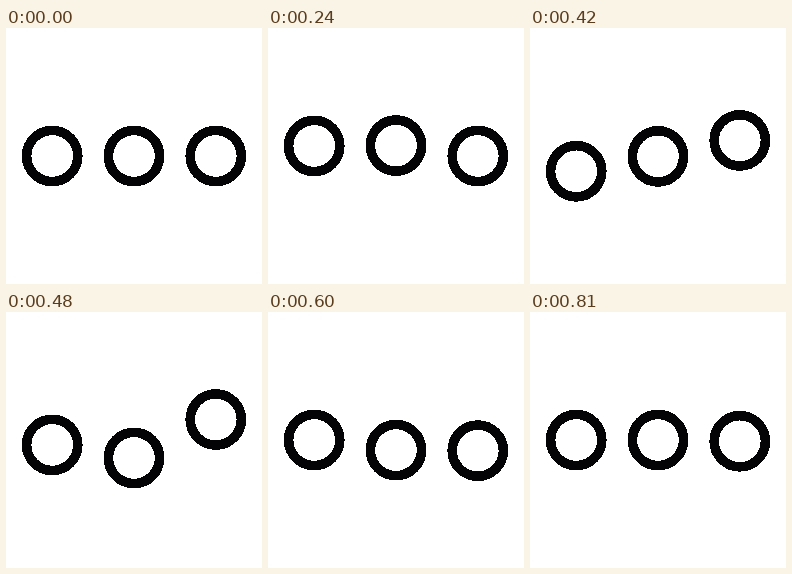
Animation of 256x256 px, one loop 0.84 s. Source, as an HTML page:

```html
<!DOCTYPE html>
<html lang="en">
<head>
<meta charset="utf-8">
<title>Bouncing rings</title>
<style>
  html, body {
    margin: 0;
    width: 100%;
    height: 100%;
    overflow: hidden;
    background: #fff;
  }
  svg {
    display: block;
    width: 100%;
    height: 100%;
    shape-rendering: crispEdges;
  }
  circle {
    cy: 128px;
    fill: none;
    stroke: #040305;
    stroke-width: 9.6px;
    animation: bounce 840ms cubic-bezier(.37, 0, .63, 1) calc(var(--i) * 150ms) infinite;
  }
  /* Three 180 ms moves, then a 300 ms rest */
  @keyframes bounce {
    0% { cy: 128px; }
    21.4286% { cy: 107.5px; }
    42.8571% { cy: 148.5px; }
    64.2857%, 100% { cy: 128px; }
  }
</style>
</head>
<body>
<svg viewBox="0 0 256 256">
  <circle style="--i: 0" cx="46.2" cy="128" r="25.6"/>
  <circle style="--i: 1" cx="128" cy="128" r="25.6"/>
  <circle style="--i: 2" cx="209.8" cy="128" r="25.6"/>
</svg>
</body>
</html>
```
